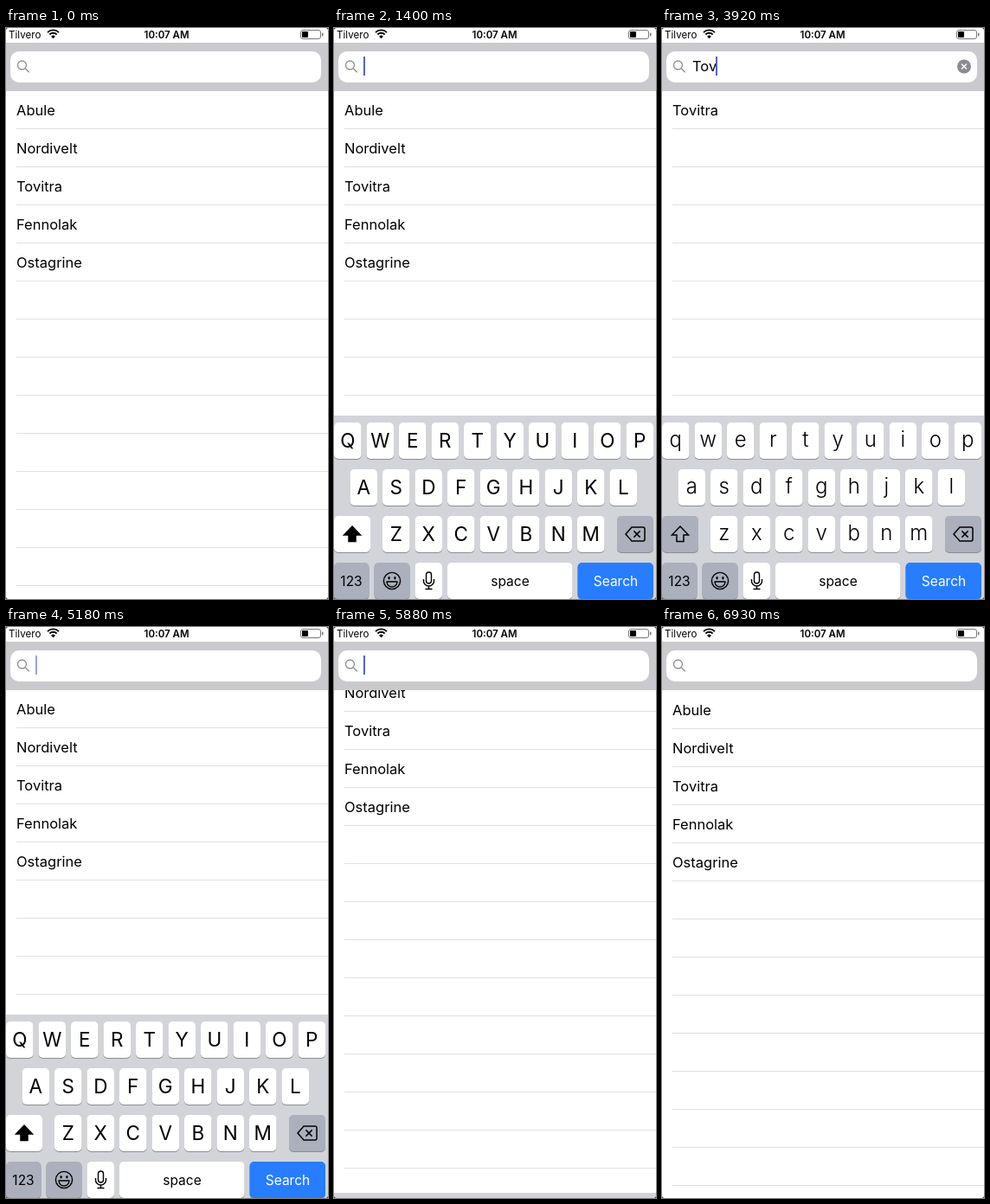
Recreate the animation shown at these times as an HTML page with a canvas. Size 372x660 px, loop 7000 ms.

```html
<!DOCTYPE html>
<html lang="en">
<head>
<meta charset="utf-8">
<title>Search list</title>
<style>
  html, body { margin: 0; width: 100%; height: 100%; overflow: hidden; background: #fff; }
  canvas { display: block; width: 372px; height: 660px; }
</style>
</head>
<body>
<canvas id="stage"></canvas>
<script>
const W = 372, H = 660, LOOP = 7000, STEP = 70;
const FONT = 'Inter, Roboto, sans-serif';
const NAMES = ['Abule', 'Nordivelt', 'Tovitra', 'Fennolak', 'Ostagrine'];
const KEYBOARD_TOP = 448, KEYBOARD_HEIGHT = 212, PITCH = 37.5, KEY_W = 31.5, KEY_H = 42;
const GREY = '#abb0bc', BLUE = '#277dfd';

// Search field contents from each moment on.
const TYPING = [
  [0, ''], [1610, 'A'], [1750, 'Ab'], [1890, 'Abu'], [2030, 'Abul'], [2170, 'Abule'],
  [2240, 'Abul'], [2380, 'Abu'], [2520, 'Ab'], [2660, 'A'], [2870, ''],
  [3220, 'T'], [3780, 'To'], [3920, 'Tov'], [4060, 'Tovi'],
  [4200, 'Tov'], [4340, 'To'], [4480, 'T'], [4620, '']
];

const canvas = document.getElementById('stage');
const ctx = canvas.getContext('2d');
const dpr = window.devicePixelRatio || 1;
canvas.width = W * dpr;
canvas.height = H * dpr;

const clamp = v => Math.max(0, Math.min(1, v));

// Remaining distance of a critically damped spring, 1 at the start and 0 at rest.
function spring(ms, omega) {
  const x = Math.max(0, ms) / 1000 * omega;
  return (1 + x) * Math.exp(-x);
}

function textAt(t) {
  return TYPING.filter(([start]) => start <= t).pop()[1];
}

function keyboardShift(t) {
  const hidden = t < 5610 ? spring(t - 900, 18.25) : 1 - spring(t - 5610, 20);
  return hidden * KEYBOARD_HEIGHT;
}

function scrollOffset(t) {
  if (t < 5610) return 0;
  if (t < 5870) return -64 * Math.sin((t - 5610) / 260 * Math.PI / 2);
  if (t < 6335) return -64 * spring(t - 5870, 22);
  if (t < 6510) return 9 * Math.sin((t - 6335) / 175 * Math.PI / 2);
  return 9 * spring(t - 6510, 9.3);
}

function cursorAlpha(t) {
  if (t < 910 || t >= 5960) return 0;
  const blink = (out, back) => clamp((t - out) / 120) - clamp((t - back) / 120);
  return 1 - blink(4780, 5110) - blink(5410, 5640);
}

function rect(x, y, w, h, color) {
  ctx.fillStyle = color;
  ctx.fillRect(x, y, w, h);
}

function roundRect(x, y, w, h, r, color) {
  ctx.beginPath();
  ctx.roundRect(x, y, w, h, r);
  ctx.fillStyle = color;
  ctx.fill();
}

function label(text, x, y, size, { color = '#000', weight = 400, align = 'left' } = {}) {
  ctx.font = `${weight} ${size}px ${FONT}`;
  ctx.textAlign = align;
  ctx.fillStyle = color;
  ctx.fillText(text, x, y);
}

function stroke(color, width, build) {
  ctx.beginPath();
  build();
  ctx.strokeStyle = color;
  ctx.lineWidth = width;
  ctx.stroke();
}

function polyline(...points) {
  points.forEach(([x, y], i) => i ? ctx.lineTo(x, y) : ctx.moveTo(x, y));
}

function cross(x, y, r, color, width) {
  stroke(color, width, () => {
    polyline([x - r, y - r], [x + r, y + r]);
    polyline([x + r, y - r], [x - r, y + r]);
  });
}

function drawList(query, offset) {
  const names = NAMES.filter(name => name.startsWith(query));
  for (let i = 0; i < 17; i++) {
    const top = 73 + i * 44 + offset;
    if (names[i]) label(names[i], 12, top + 28, 16.5);
    rect(12, top + 43, W - 12, 1, '#e0e0e2');
  }
}

function drawStatusBar() {
  rect(0, 0, W, 17, '#fff');
  label('Tilvero', 3, 11.5, 11.6);
  label('10:07 AM', 185.5, 11.5, 11.5, { weight: 600, align: 'center' });

  for (const r of [9.2, 5.8]) {
    stroke('#000', 1.9, () => ctx.arc(54.5, 11.6, r, -Math.PI * 0.75, -Math.PI * 0.25));
  }
  ctx.beginPath();
  ctx.moveTo(54.5, 12.2);
  ctx.arc(54.5, 12.2, 3.4, -Math.PI * 0.75, -Math.PI * 0.25);
  ctx.fillStyle = '#000';
  ctx.fill();

  stroke('#777', 1, () => ctx.roundRect(340.5, 2.5, 23, 10, 2.5));
  roundRect(342, 4, 7, 7, 1, '#000');
  roundRect(365, 5.5, 1.5, 4, 0.7, '#777');
}

function drawSearchBar(query, alpha) {
  rect(0, 17, W, 56, '#c9c9ce');
  roundRect(5, 27, 359, 36, 10, '#fff');
  stroke('#8e8e93', 1.3, () => {
    ctx.arc(18.5, 43, 5, 0, Math.PI * 2);
    polyline([22.2, 46.7], [26.8, 51.2]);
  });

  label(query, 35, 50, 16.5);
  const cursorX = 34 + Math.round(ctx.measureText(query).width);
  ctx.globalAlpha = clamp(alpha);
  rect(cursorX, 33, 2, 22, '#5365bb');
  ctx.globalAlpha = 1;

  if (query) {
    roundRect(341, 36.5, 16, 16, 8, '#8b8b90');
    cross(349, 44.5, 3, '#fff', 1.4);
  }
}

function key(x, y, w, color = '#fff') {
  roundRect(x, y + 1, w, KEY_H, 5, '#8b8d93');
  roundRect(x, y, w, KEY_H, 5, color);
}

function letterRow(letters, x, y, upper) {
  [...letters].forEach((letter, i) => {
    const left = x + i * PITCH;
    key(left, y, KEY_W);
    label(upper ? letter : letter.toLowerCase(), left + KEY_W / 2, y + (upper ? 29 : 27.5),
      upper ? 22.5 : 24, { weight: upper ? 400 : 300, align: 'center' });
  });
}

function drawShift(y, upper) {
  key(0, y, 42, upper ? '#fff' : GREY);
  const c = y + 21;
  stroke('#000', 1.5, () => {
    polyline([21, c - 9], [30.5, c + 1], [25, c + 1], [25, c + 8.5],
      [17, c + 8.5], [17, c + 1], [11.5, c + 1]);
    ctx.closePath();
  });
  if (upper) {
    ctx.fillStyle = '#000';
    ctx.fill();
  }
}

function drawDelete(y) {
  key(327, y, 42, GREY);
  const c = y + 21;
  stroke('#000', 1.5, () => {
    polyline([337, c], [344, c - 8], [357, c - 8]);
    ctx.arcTo(359, c - 8, 359, c - 6, 2);
    ctx.lineTo(359, c + 6);
    ctx.arcTo(359, c + 8, 357, c + 8, 2);
    ctx.lineTo(344, c + 8);
    ctx.closePath();
  });
  cross(350, c, 3.6, '#000', 1.5);
}

function drawEmoji(x, y) {
  stroke('#000', 1.4, () => ctx.arc(x, y, 9.6, 0, Math.PI * 2));
  for (const side of [-1, 1]) {
    ctx.beginPath();
    ctx.ellipse(x + side * 3.4, y - 3.2, 1.2, 1.8, 0, 0, Math.PI * 2);
    ctx.fillStyle = '#000';
    ctx.fill();
  }
  stroke('#000', 1.3, () => {
    ctx.arc(x, y + 1, 6, 0, Math.PI);
    ctx.closePath();
  });
}

function drawMic(x, y) {
  stroke('#000', 1.4, () => ctx.roundRect(x - 3, y - 10, 6, 13, 3));
  stroke('#000', 1.4, () => {
    ctx.moveTo(x + 6, y - 2);
    ctx.lineTo(x + 6, y);
    ctx.arc(x, y, 6, 0, Math.PI);
    ctx.lineTo(x - 6, y - 2);
    polyline([x, y + 6], [x, y + 9.5]);
    polyline([x - 4, y + 9.5], [x + 4, y + 9.5]);
  });
}

function drawKeyboard(upper, shift) {
  if (shift > KEYBOARD_HEIGHT - 0.5) return;
  ctx.save();
  ctx.translate(0, Math.round(KEYBOARD_TOP + shift));
  rect(0, 0, W, KEYBOARD_HEIGHT, '#d2d4da');
  letterRow('QWERTYUIOP', 0, 8, upper);
  letterRow('ASDFGHJKL', 18.5, 62, upper);
  letterRow('ZXCVBNM', 56, 116, upper);
  drawShift(116, upper);
  drawDelete(116);

  key(0, 170, 40.5, GREY);
  label('123', 20, 197, 15.5, { align: 'center' });
  key(46.5, 170, 41, GREY);
  drawEmoji(67, 191);
  key(93.5, 170, KEY_W);
  drawMic(109.5, 191);
  key(131, 170, 144.5);
  label('space', 203.5, 196.5, 15.5, { align: 'center' });
  key(281.5, 170, 87.5, BLUE);
  label('Search', 325.5, 196.5, 15.5, { color: '#fff', align: 'center' });
  ctx.restore();
}

function drawCorners() {
  ctx.fillStyle = '#555';
  for (const [x, y] of [[0, 0], [W, 0], [0, H], [W, H]]) {
    const dx = x ? -2 : 2, dy = y ? -2 : 2;
    ctx.beginPath();
    polyline([x, y], [x + dx, y], [x, y + dy]);
    ctx.fill();
  }
}

function draw(now) {
  const t = Math.floor((now % LOOP) / STEP) * STEP;
  const query = textAt(t);
  ctx.setTransform(dpr, 0, 0, dpr, 0, 0);
  rect(0, 0, W, H, '#fff');
  drawList(query, Math.round(scrollOffset(t)));
  drawSearchBar(query, cursorAlpha(t));
  drawStatusBar();
  drawKeyboard(!query, keyboardShift(t));
  drawCorners();
}

const start = performance.now();
function tick() {
  draw(performance.now() - start);
  requestAnimationFrame(tick);
}
tick();
</script>
</body>
</html>
```
